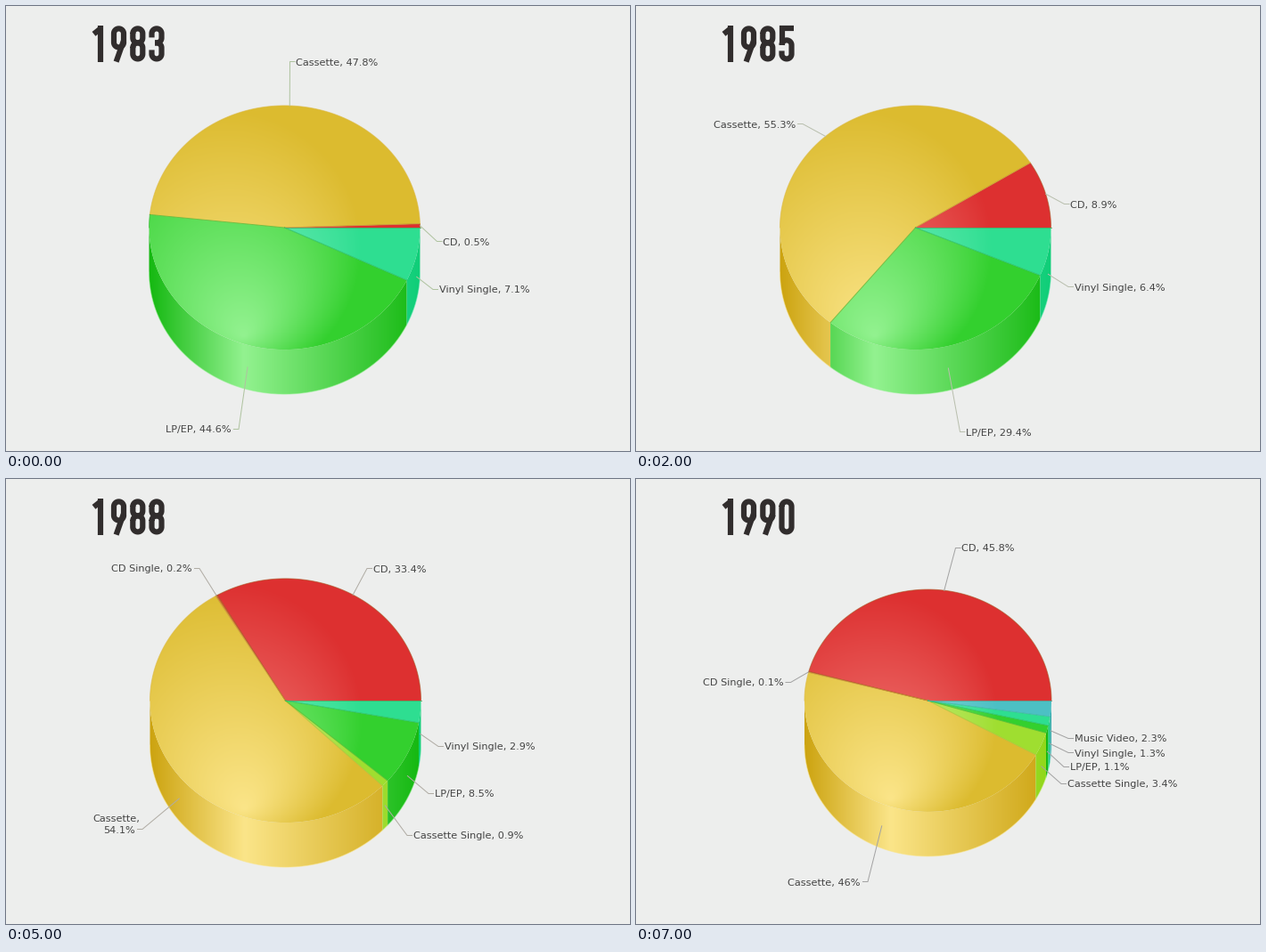
Animation of 700x500 px, one loop 8000 ms. Source, as a matplotlib script:

```python
import numpy as np
import matplotlib.pyplot as plt
from matplotlib.animation import FuncAnimation
from matplotlib.path import Path
from matplotlib.patches import PathPatch

W, H = 700, 500
PX = 0.72          # points per pixel at 100 dpi
CY, DEPTH = 249, 50
TILT = 0.902       # vertical / horizontal radius
INK = "#312d2d"

# slice colours: top, highlight, side, edge
COLORS = {
    "CD": ("#dd3030", "#f38480", "#b82020", "#a8521f"),
    "CD Single": ("#d9662c", "#f0a880", "#b04818", "#a8521f"),
    "Cassette": ("#dcbb2f", "#fbe589", "#cca30f", "#dcb840"),
    "Cassette Single": ("#9fde30", "#d0f090", "#8fd616", "#93cc30"),
    "LP/EP": ("#33d02e", "#93f290", "#14b810", "#2fb52c"),
    "Vinyl Single": ("#2ede91", "#80efc0", "#0fce78", "#27c782"),
    "Music Video": ("#4cc0c4", "#98dede", "#2ca6aa", "#48b0b4"),
}

# year: (centre x, radius, leader colour, [(name, percent, elbow x, elbow y)])
YEARS = {
    1983: (312.5, 152, "#afc3a0", [
        ("CD", 0.5, 483.5, 264.5), ("Cassette", 47.8, 318.5, 62.5),
        ("LP/EP", 44.6, 261, 475.5), ("Vinyl Single", 7.1, 479, 318.5)]),
    1984: (312.5, 152, "#b3bfa8", [
        ("CD", 2.4, 484, 253.5), ("Cassette", 55, 253.5, 77.5),
        ("LP/EP", 35.7, 318, 486.5), ("Vinyl Single", 6.9, 479, 317.5)]),
    1985: (313.5, 152, "#b9bfae", [
        ("CD", 8.9, 480.5, 222.5), ("Cassette", 55.3, 187, 132.5),
        ("LP/EP", 29.4, 363.5, 478.5), ("Vinyl Single", 6.4, 485, 315.5)]),
    1986: (314.5, 152, "#a9c9c4", [
        ("CD", 20, 462, 166.5), ("Cassette", 53.9, 142.5, 236.5),
        ("LP/EP", 21.2, 427.5, 437.5), ("Vinyl Single", 4.9, 486, 307.5)]),
    1987: (313.5, 152, "#aeb0ae", [
        ("CD", 28.6, 433.5, 123.5), ("Cassette", 53.2, 145.5, 334.5),
        ("Cassette Single", 0.3, 396, 458.5), ("LP/EP", 14.3, 456, 391.5),
        ("Vinyl Single", 3.7, 485, 301.5)]),
    1988: (313.5, 152, "#b0aca4", [
        ("CD", 33.4, 405, 100.5), ("CD Single", 0.2, 217, 100.5),
        ("Cassette", 54.1, 153, 393.5), ("Cassette Single", 0.9, 450, 400.5),
        ("LP/EP", 8.5, 474, 353.5), ("Vinyl Single", 2.9, 485, 300.5)]),
    1989: (313.5, 152, "#b4a396", [
        ("CD", 39.3, 376.5, 80.5), ("Cassette", 50.8, 193, 430.5),
        ("Cassette Single", 3, 471, 367.5), ("LP/EP", 3.3, 480, 335.5),
        ("Vinyl Single", 1.8, 485, 309.5), ("Music Video", 1.8, 485, 291.5)]),
    1990: (327.5, 138.5, "#a3a3a3", [
        ("CD", 45.8, 358.5, 77.5), ("CD Single", 0.1, 173.5, 228.5),
        ("Cassette", 46, 260, 452.5), ("Cassette Single", 3.4, 477, 342.5),
        ("LP/EP", 1.1, 480, 323.5), ("Vinyl Single", 1.3, 485, 307.5),
        ("Music Video", 2.3, 485, 291.5)]),
}

plt.rcParams["font.family"] = "DejaVu Sans"
fig = plt.figure(figsize=(W / 100, H / 100), dpi=100, facecolor="#edeeed")
ax = fig.add_axes([0, 0, 1, 1])

X0, X1, Y0, Y1 = 150, 480, 100, 450
GX, GY = np.meshgrid(np.arange(X0, X1) + 0.5, np.arange(Y0, Y1) + 0.5)


def rgb(c):
    return np.array([int(c[i:i + 2], 16) for i in (1, 3, 5)]) / 255


# ---- year digits, as strokes on an 11 x 34 centre-line box ----

def arc(y, a0, a1, r=5.5):
    a = np.radians(np.linspace(a0, a1, 24))
    return list(zip(5.5 + 5.5 * np.cos(a), y - r * np.sin(a)))


def loop(top, bottom):
    pts = arc(top + 5.5, 180, 0) + arc(bottom - 5.5, 0, -180)
    return pts + pts[:2]


def turned(strokes):
    return [[(11 - x, 34 - y) for x, y in s] for s in strokes]


SIX = [loop(13, 34), [(8.4, -3.2), (0.2, 20)]]
DIGITS = {
    "0": [loop(0, 34)],
    "1": [[(5.5, -3.2), (5.5, 37.2)], [(5.5, 0), (-2, 6)]],
    "3": [[(0, 10)] + arc(5.5, 180, 0) + arc(10.5, 0, -90) + [(3.5, 16)],
          [(3.5, 16), (5.5, 16)] + arc(21.5, 90, 0) + arc(28.5, 0, -180) + [(0, 24)]],
    "4": [[(7, -3.2), (0.2, 26.5), (14.5, 26.5)], [(9, 15), (9, 37.2)]],
    "5": [[(13, 0), (0, 0), (0, 19)],
          arc(18.5, 180, 0) + arc(28.5, 0, -180) + [(0, 25)]],
    "6": SIX,
    "7": [[(0, 8), (0, 0), (11, 0), (11, 4), (3.5, 37.2)]],
    "8": [loop(0, 16), loop(16, 34)],
    "9": turned(SIX),
}


def draw_year(year):
    for ch, x in zip(str(year), (100.5, 121, 142.3, 163.5)):
        for stroke in DIGITS[ch]:
            sx, sy = np.array(stroke).T
            ax.plot(x + sx, 25.4 + sy, color=INK, lw=6.2 * PX,
                    solid_capstyle="butt", solid_joinstyle="miter")


# ---- pie ----

def rim(cx, r, a0, a1):
    a = np.radians(np.linspace(a0, a1, 120))
    return np.column_stack([cx + r * np.cos(a), CY - r * TILT * np.sin(a)])


def focal(cx, r):
    """Radial gradient with an off-centre focus: 1 at the focus, 0 at the circle."""
    fx, fy = cx - 0.3 * r, CY + 0.8 * r
    gx, gy = fx - (cx - 0.45 * r), fy - (CY + 0.14 * r)
    radius = 1.02 * r
    dx, dy = GX - fx, GY - fy
    dd = dx ** 2 + dy ** 2 + 1e-6
    gd = gx * dx + gy * dy
    reach = -gd + np.sqrt(gd ** 2 + dd * (radius ** 2 - gx ** 2 - gy ** 2))
    return np.clip(1 - dd / reach, 0, 1)


def band(cx, r):
    """Horizontal gradient of the side wall."""
    fx = cx - 0.3 * r
    return np.clip(np.where(GX < fx, (GX - cx + r) / (0.7 * r),
                            (cx + r - GX) / (1.3 * r)), 0, 1)


def shade(points, low, high, t):
    """Fill a polygon with a blend from low to high by the field t."""
    patch = PathPatch(Path(points), fc="none", ec="none")
    ax.add_patch(patch)
    img = rgb(low) + (rgb(high) - rgb(low)) * t[..., None]
    im = ax.imshow(img, extent=(X0, X1, Y1, Y0), aspect="auto",
                   interpolation="nearest", zorder=1)
    im.set_clip_path(patch)


def line(points, color, width=1, alpha=1.0, z=3):
    x, y = np.array(points).T
    ax.plot(x, y, color=color, lw=width * PX, alpha=alpha, zorder=z)


def draw_slice(name, cx, r, a0, a1):
    top, light, side, edge = COLORS[name]
    if a1 > 180:
        upper = rim(cx, r, max(a0, 180), a1)
        lower = upper + (0, DEPTH)
        shade(np.vstack([upper, lower[::-1], upper[:1]]), side, light, band(cx, r))
        line(lower, light, 1, 0.55)
    outer = rim(cx, r, a0, a1)
    hub = [(cx, CY)]
    shade(np.vstack([hub, outer, hub]), top, light, focal(cx, r))
    for end in (outer[0], outer[-1]):
        line([hub[0], end], edge, 0.9, 0.55)
    if a0 < 180:
        line(rim(cx, r, a0, min(a1, 180)), edge, 1, 0.6)


def draw_label(name, pct, ex, ey, cx, r, mid, color):
    a = np.radians(mid)
    px, py = cx + r * np.cos(a), CY - r * TILT * np.sin(a)
    if mid > 180:
        py += DEPTH / 2
    right = np.cos(a) >= 0
    sign = 1 if right else -1
    line([(px, py), (ex, ey), (ex + 5.5 * sign, ey)], color, z=4)

    def put(x, y, s):
        ax.text(x, y, s, fontsize=11.2 * PX, color="#444444", zorder=5,
                ha="left" if right else "right", va="baseline")

    value = f"{pct:g}%"
    if not right and ex < 160:
        put(ex - 3, ey - 8, name + ",")
        put(ex - 8, ey + 4.5, value)
    else:
        put(ex + (6.8 if right else -8), ey + 4, f"{name}, {value}")


def update(i):
    ax.clear()
    ax.axis("off")
    year = 1983 + i
    cx, r, color, parts = YEARS[year]
    total = sum(p[1] for p in parts)
    start, mids = 0, []
    for name, pct, *_ in parts:
        end = start + 360 * pct / total
        draw_slice(name, cx, r, start, end)
        mids.append((start + end) / 2)
        start = end
    for part, mid in zip(parts, mids):
        draw_label(*part, cx, r, mid, color)
    draw_year(year)
    ax.set(xlim=(0, W), ylim=(H, 0))
    return []


anim = FuncAnimation(fig, update, frames=len(YEARS), interval=1000,
                     init_func=lambda: [], repeat=True, repeat_delay=0)
plt.show()
```
